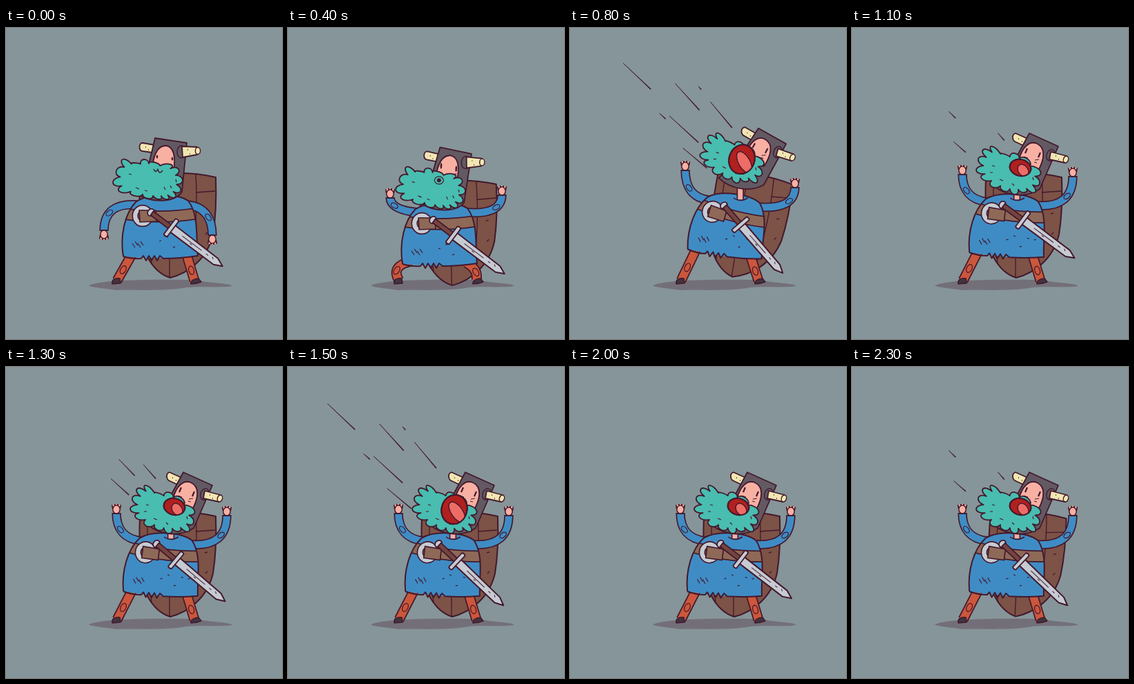
Write an HTML page with a canvas that moves like this. It is 400 by 452 pixels and loops after 2.4 s.

```html
<!DOCTYPE html>
<html lang="en">
<meta charset="utf-8">
<title>Shouting warrior</title>
<style>
html, body { margin: 0; width: 100%; height: 100%; overflow: hidden; background: #869599; }
canvas { display: block; }
</style>
<canvas id="stage" width="400" height="452"></canvas>
<script>
const c = document.getElementById('stage').getContext('2d');
const ink = '#43192c', blue = '#3f8cc5', teal = '#48bdb0', skin = '#f8b0a3', horn = '#f0e6b2', iron = '#625963',
  wood = '#7d5247', grip = '#74443f', strap = '#8f6957', steel = '#c6cbd3', trouser = '#cb573c', boot = '#40343f';

// Key poses. hands: left and right x, y; torso: shift and lean; sword: pommel and angle; head: shift, tilt, beard lift.
const poses = [
  { hands: [142, 295, 299, 302], torso: [0, 0, 0], sword: [210, 268, 37], head: [0, 0, 0, 0], swing: [0] },
  { hands: [148, 246, 310, 242], torso: [-4, 11, 0], sword: [210, 279, 37], head: [2, 14, 3, 0], swing: [-1] },
  { hands: [167, 206, 326, 231], torso: [0, -3, 8], sword: [223, 258, 49], head: [12, -8, 5, 1], swing: [9] },
  { hands: [160, 212, 320, 215], torso: [0, -2, 4], sword: [218, 257, 40], head: [0, 0, 0, 0], swing: [0] }
];
const pivot = [224, 332];

// Tips of the beard's tufts.
const calmTips = [238,198, 214,195, 200,191, 185,196, 169,191, 160,207, 155,225, 165,238, 186,244,
  206,248, 222,249, 234,249, 245,246, 253,237, 256,221, 250,205];
const loudTips = [254,190, 236,182, 220,183, 203,172, 190,177, 183,190, 180,207, 188,219, 203,231,
  220,237, 236,242, 250,239, 265,239, 272,226, 273,208];

// Shout streaks as centre x, y and length.
const roar = [[77, 72, 55], [150, 102, 52], [168, 89, 6], [199, 128, 49], [114, 130, 12], [145, 149, 57], [161, 191, 45]];
const near = [[175, 146, 33], [208, 152, 27], [165, 174, 35]];
const far = [[145, 126, 14], [216, 158, 14], [156, 173, 23]];

const mix = (a, b, k) => a + (b - a) * k;
const mixAll = (a, b, k) => a.map((v, i) => mix(v, b[i], k));
const clamp = v => Math.max(0, Math.min(1, v));
const rad = deg => deg * Math.PI / 180;
const easeOut = v => 1 - (1 - clamp(v)) ** 2;
const smooth = v => clamp(v) ** 2 * (3 - 2 * clamp(v));

function poseAt(k) {
  const i = Math.min(2, Math.floor(k)), out = {};
  for (const key in poses[i]) out[key] = mixAll(poses[i][key], poses[i + 1][key], k - i);
  return out;
}

function paint(path, fill, w = 1.8) {
  const p = typeof path === 'string' ? new Path2D(path) : path;
  if (fill) { c.fillStyle = fill; c.fill(p); }
  if (w) { c.strokeStyle = ink; c.lineWidth = w; c.stroke(p); }
}

function oval(x, y, rx, ry, fill, w, turn = 0) {
  const p = new Path2D();
  p.ellipse(x, y, rx, ry, turn, 0, 7);
  paint(p, fill, w);
  return p;
}

function turned(x, y, deg, draw) {
  c.save();
  c.translate(x, y);
  c.rotate(rad(deg));
  draw();
  c.restore();
}

function about(x, y, dx, dy, deg, draw) {
  turned(x + dx, y + dy, deg, () => { c.translate(-x, -y); draw(); });
}

// Rounded fingers reaching the tips, with notches pulled towards the middle.
function tufts(tips, cx, cy, pull) {
  const n = tips.length / 2, p = new Path2D();
  const tip = i => [tips[i % n * 2], tips[i % n * 2 + 1]];
  const notch = i => mixAll(mixAll(tip(i), tip(i + 1), .5), [cx, cy], pull);
  p.moveTo(...notch(n - 1));
  for (let i = 0; i < n; i++) {
    const a = notch(i + n - 1), b = notch(i), mid = mixAll(a, b, .5);
    const reach = tip(i).map((v, j) => (v - mid[j]) * 1.33);
    p.bezierCurveTo(a[0] + reach[0], a[1] + reach[1], b[0] + reach[0], b[1] + reach[1], ...b);
  }
  p.closePath();
  return p;
}

function tube(from, bend, to, w, fill) {
  const p = new Path2D(`M${from}Q${bend} ${to}`);
  paint(p, null, w + 3.4);
  c.strokeStyle = fill;
  c.lineWidth = w;
  c.stroke(p);
}

function limb(from, bend, to, w, fill) {
  tube(from, bend, to, w, fill);
  const spot = mixAll(mixAll(from, bend, .6), mixAll(bend, to, .6), .6);
  oval(...spot, w * .55, w * .33, null, 1.2, Math.atan2(to[1] - from[1], to[0] - from[0]));
}

// A point fixed to the torso, in stage coordinates.
function onTorso([dx, dy, lean], x, y) {
  const s = Math.sin(rad(lean)), q = Math.cos(rad(lean)), px = x - pivot[0], py = y - pivot[1];
  return [pivot[0] + dx + px * q - py * s, pivot[1] + dy + px * s + py * q];
}

function arm(shoulder, hand, side) {
  const elbow = [hand[0], shoulder[1] + side * 4];
  limb(shoulder, elbow, hand, 10, blue);
  turned(...hand, Math.atan2(hand[1] - elbow[1], hand[0] - elbow[0]) * 180 / Math.PI, () => {
    for (const s of [-4, 0, 4]) tube([6, s * .8], [10, s], [13 - Math.abs(s) / 4, s * 1.1], 2.4, skin);
    oval(5, 0, 6, 5.2, skin, 1.5);
    paint('M-1-6V6');
  });
}

function leg(hip, ankle, bend) {
  const [x, y] = mixAll(hip, ankle, .5);
  limb(hip, [x + bend, y - Math.abs(bend) / 3], ankle, 11.5, trouser);
}

function shield(drop, swing) {
  about(245, 345, 0, drop, swing, () => {
    paint('M194 218C230 208 270 209 304 217C305 245 304 275 300 300C292 335 265 356 238 363C222 358 212 346 205 333C196 300 192 260 194 218Z', wood, 2);
    paint('M275 212Q279 275 268 348M237 212V363M205 216Q204 280 211 343M275 239L303 237M289 300l3-3M288 270l4-1', null, 1.3);
  });
}

function torso([dx, dy, lean]) {
  about(...pivot, dx, dy, lean, () => {
    let tears = '';
    for (let i = 0; i < 7; i++) tears += `L${199 + i * 4} ${i % 2 ? 338 : 331}`;
    const shape = new Path2D(`M170 332C165 302 172 270 188 253C206 240 248 240 264 251C280 272 275 304 278 331L228 335${''}` +
      `L224 334L170 332Z`);
    const tunic = new Path2D(`M170 332C165 302 172 270 188 253C206 240 248 240 264 251C280 272 275 304 278 331` +
      `L227 335L199 334L170 332Z`);
    paint(tunic, blue, 0);
    c.save();
    c.clip(shape);
    about(222, 275, 0, 0, lean, () => tube([140, 264], [222, 284], [304, 264], 14, strap));
    c.restore();
    paint(`M170 332Q184 336 196 335${tears}L228 335Q254 335 278 331C275 304 280 272 264 251C248 240 206 240 188 253C172 270 165 302 170 332`, null, 2);
    for (let i = 0; i < 4; i++) paint(`M${183 + i * 4} ${313 - i % 2 * 3}l4 6`, null, 1.2);
    for (let i = 0; i < 5; i++) paint(`M${222 + i * 10} ${310 + 9 * Math.sin(i * 4)}l3 ${i % 2 ? 1 : -1}`, null, 1.2);
    turned(198, 273, lean * 1.5, () => {
      oval(0, 0, 10.8, 11.5, null, 9.5);
      c.strokeStyle = steel;
      c.lineWidth = 6.2;
      c.beginPath();
      c.ellipse(0, 0, 10.8, 11.5, 0, 0, 7);
      c.stroke();
      paint('M-5-8L19-8L20 8L-4 9Z', strap, 1.7);
    });
  });
}

function sword([x, y, deg]) {
  turned(x, y, deg, () => {
    paint('M38-6L118-5L130 0L118 6L38 6Z', steel, 2);
    paint('M57 0H92M100 0h4M110-2l3 2M72 2h4', null, 1);
    oval(0, 0, 4.5, 5.5, steel);
    paint('M2-3.5L36-3.5V3.5H2Z', grip);
    paint('M34-14Q37-16 40-14V14Q37 16 34 14Z', steel);
  });
}

function calmHead([x, y, deg], tense) {
  about(228, 205, x, y, deg, () => {
    paint('M198 167C192 167 192 178 198 179L212 181L215 170Z', horn);
    paint('M216 160L262 167L255 238C247 253 212 256 190 241L207 198Z', iron);
    paint('M212 204C214 182 221 171 232 171C244 173 246 187 243 208Z', skin);
    oval(254, 180, 6, 9, iron, 1.4);
    paint('M255 172L277 173Q283 178 277 184L256 188Z', horn);
    oval(278, 178.5, 3.6, 5, horn, 1.4);
    paint('M263 177h1M266 183h1M202 173h1M206 177h1', null, 1.4);
    for (const [ex, ey] of [[219, 187], [241, 190]]) oval(ex, ey, 1.3, mix(2.6, 4.2, tense), ink, 0);
    paint(tufts(calmTips, 208, 219, .16), teal);
    if (tense > .5) {
      paint('M215 195l6 2M237 198l5-1', null, 1);
      oval(217, 208, 6.5, 5.5, teal, 1.2);
      oval(217, 208, 3, 2.8, ink, 0);
    } else paint('M214 205Q217 212 220 205Q222 214 227 207', null, 1.4);
    paint('M178 212l4 1M188 232l5 2M201 236l4 1M229 231l2 4M238 229l2 4M246 220l1 4', null, 1.2);
  });
}

function loudHead([x, y, deg, lift], open) {
  const neck = 239 + x * .65;
  tube([neck, 225 + y], [neck, 238], [neck, 249], 7, skin);
  paint(`M${neck - 10} 247Q${neck} 254 ${neck + 11} 247`, null, 1.5);
  about(250, 200, x, y, deg, () => {
    paint('M237 153C231 155 232 164 238 166L251 172L257 162Z', horn);
    paint('M257 153L299 172L272 234C254 247 225 245 206 230L236 192Z', iron);
    paint('M242 192C246 174 257 163 268 168C281 174 279 190 270 207L256 206Z', skin);
    oval(288, 185, 6, 8.5, iron, 1.4, .3);
    paint('M288 180L311 186Q316 191 309 196L286 191Z', horn);
    oval(310, 191, 3.6, 5, horn, 1.4, .3);
    paint('M295 186h1M299 191h1M241 161h1M246 165h1', null, 1.4);
    paint('M254 175L251 182M273 181L270 188', null, 2.2);
    paint('M249 187l6 2M265 192l6-1M264 195l4 1', null, 1);
    c.translate(-4 * lift, -7 * lift);
    paint(tufts(loudTips, 232, 208, .18), teal);
    const [mx, my, rx, ry] = mixAll([244, 203, 15.5, 12], [241, 207, 18.5, 21.5], open);
    const mouth = oval(mx, my, rx, ry, '#b0201f', 2, .25);
    c.save();
    c.clip(mouth);
    oval(mx + 4, my + 4, rx * .45, ry * .8, '#ee6c66', 1.4, -.6);
    c.restore();
    paint(mouth, null, 2);
    paint('M203 200l4 1M200 210l4 0M214 220l5 2M232 226l3 3M262 217l1 4', null, 1.2);
  });
}

// Streaks fan out slightly and taper towards their outer end.
function streak([x, y, len]) {
  turned(x, y, 43 + .1 * (x - y), () => paint(`M${-len / 2} 0L${len / 2}-.6V.6Z`, ink, .6));
}

function streaks(f, open) {
  if (open === 1) about(0, 0, f < 12 ? 20 : 0, f < 12 ? -2 : 0, 0, () => roar.forEach(streak));
  else if (f > 8) {
    const phase = (f - 9) % 4;
    if (phase < 3) near.forEach((ray, i) => {
      const [x, y, len] = mixAll(ray, far[i], phase / 2);
      streak([x, y, len + (phase === 1 ? 25 : 0)]);
    });
  }
}

function render(f) {
  const k = easeOut((f - 1) / 3) + smooth((f - 5) / 3) + easeOut((f - 8) / 3);
  const open = Math.max(0, 1 - Math.min(Math.abs(f - 8), Math.abs(f - 15)) / 2);
  const p = poseAt(k), drop = Math.max(0, p.torso[1]);
  if (f > 10) p.sword[2] += 3.5 * Math.cos((f - 15) * Math.PI / 4);
  p.head[1] -= 18 * Math.max(0, 1 - Math.abs(f - 7));

  c.fillStyle = '#869599';
  c.fillRect(0, 0, 400, 452);
  c.lineJoin = 'round';
  paint('M120 374C140 366 200 365 270 366C300 371 325 371 328 375C310 378 280 375 262 377C230 383 190 380 160 381C140 378 122 377 120 374Z', '#736f78', 0);
  shield(drop, p.swing[0] + Math.max(0, f - 20));
  leg(onTorso(p.torso, 262, 330), [273, 367], drop);
  leg(onTorso(p.torso, 183, 328), [161, 367], -drop * 2);
  paint('M154 372C153 366 157 363 165 364L166 371Z', boot, 1.5);
  paint('M268 372C267 368 272 364 279 364L283 369Q276 372 268 372Z', boot, 1.5);
  arm(onTorso(p.torso, 191, 257), p.hands.slice(0, 2), -1);
  arm(onTorso(p.torso, 263, 257), p.hands.slice(2), 1);
  torso(p.torso);
  sword(p.sword);
  if (k < 1.5) calmHead(p.head, clamp(k));
  else loudHead(p.head, open);
  streaks(f, open);
}

function tick() {
  render(Math.floor(performance.now() % 2400 / 100));
  requestAnimationFrame(tick);
}
tick();
</script>
</html>
```
